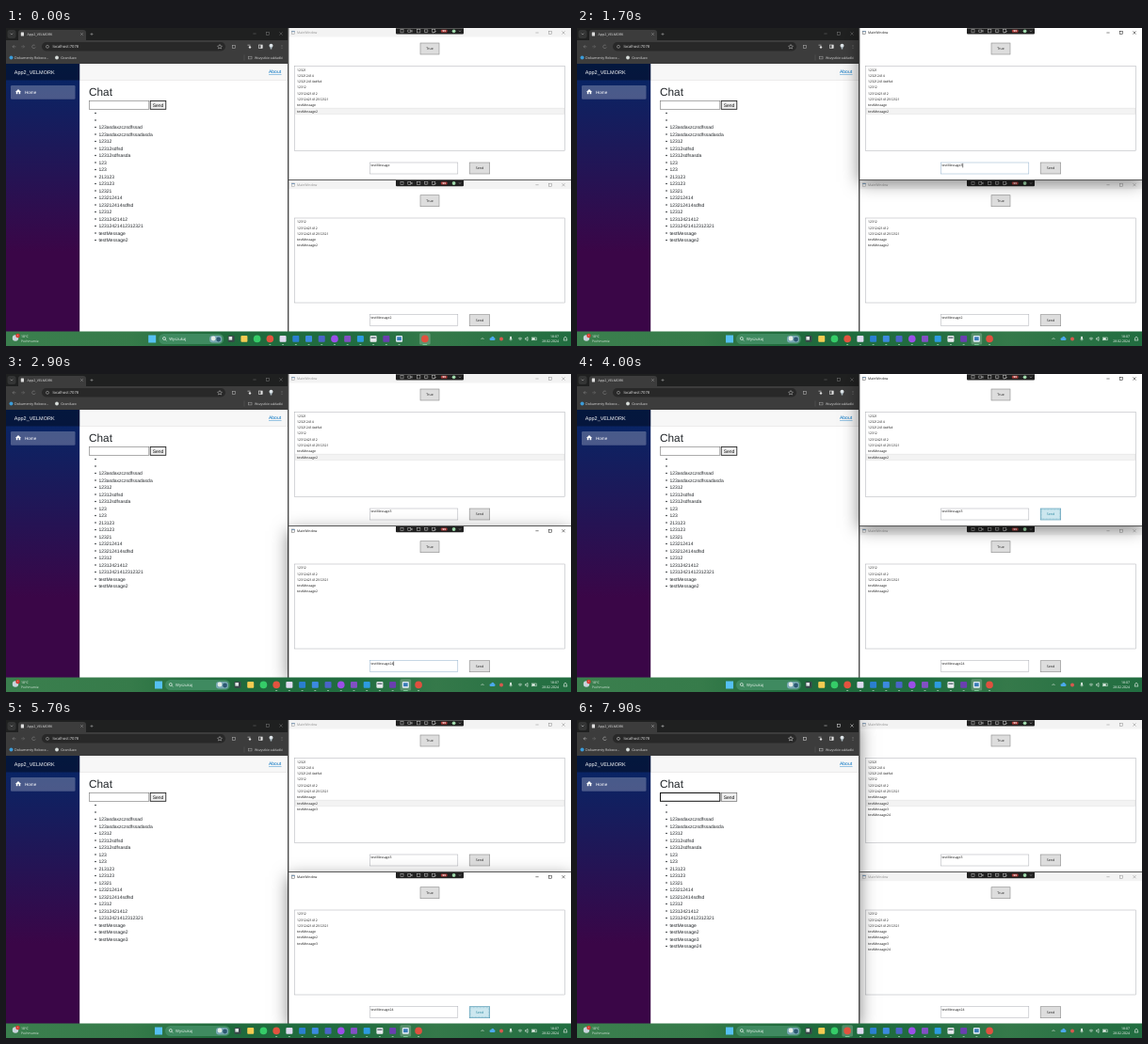
Animation, 600 px wide and 338 px high, one loop 8000 ms. Source, as an HTML page with a canvas:

```html
<!DOCTYPE html>
<html lang="pl">
<head>
<meta charset="utf-8">
<title>Chat</title>
<style>
html, body { margin: 0; width: 100%; height: 100%; overflow: hidden; background: #fff; }
canvas { display: block; width: 600px; height: 338px; }
</style>
</head>
<body>
<canvas id="stage"></canvas>
<script>
const W = 600, H = 338, LOOP = 8000;
const UI = '"Open Sans", "Noto Sans", sans-serif';
const WEB = '"Liberation Sans", Arial, sans-serif';
const canvas = document.getElementById('stage');
const ctx = canvas.getContext('2d');
const dpr = window.devicePixelRatio || 1;
canvas.width = W * dpr;
canvas.height = H * dpr;

// Moments of the session, in ms
const T = {
  topFocus: 800, topTyped: 1500, bottomFocus: 1900, bottomTyped: 2400,
  topHover: 3600, topSend: 4000, topReceived: 4300, topLeave: 5000,
  bottomHover: 5150, bottomSend: 5700, bottomReceived: 6000,
  browserFocus: 7200, caretOff: 7900
};

const APP = 'App2_VELMORK';
const chatLog = ['', '', '123asdaxzczsdfssad', '123asdaxzczsdfssadasda', '12312',
  '12312sdfsd', '12312sdfsasda', '123', '123', '213123', '123123', '12321',
  '123212414', '123212414sdfsd', '12312', '12312421412', '12312421412312321',
  'testMessage', 'testMessage2'];
const topLog = chatLog.slice(11);
const bottomLog = chatLog.slice(14);

const clamp = v => Math.max(0, Math.min(1, v));
const easeOut = v => 1 - Math.pow(1 - clamp(v), 3);

function rect(x, y, w, h, fill) {
  ctx.fillStyle = fill;
  ctx.fillRect(x, y, w, h);
}

function frame(x, y, w, h, color, lw = 0.5) {
  ctx.strokeStyle = color;
  ctx.lineWidth = lw;
  ctx.strokeRect(x, y, w, h);
}

function pill(x, y, w, h, r, fill) {
  ctx.fillStyle = fill;
  ctx.beginPath();
  ctx.roundRect(x, y, w, h, r);
  ctx.fill();
}

function dot(x, y, r, fill) {
  ctx.fillStyle = fill;
  ctx.beginPath();
  ctx.arc(x, y, r, 0, Math.PI * 2);
  ctx.fill();
}

function ring(x, y, r, color, lw = 0.6, from = 0, to = Math.PI * 2) {
  ctx.strokeStyle = color;
  ctx.lineWidth = lw;
  ctx.beginPath();
  ctx.arc(x, y, r, from, to);
  ctx.stroke();
}

// Polyline through x, y pairs
function line(color, lw, ...p) {
  ctx.strokeStyle = color;
  ctx.lineWidth = lw;
  ctx.beginPath();
  for (let i = 0; i < p.length; i += 2) ctx.lineTo(p[i], p[i + 1]);
  ctx.stroke();
}

function cross(x, y, r, color, lw = 0.5) {
  line(color, lw, x - r, y - r, x + r, y + r);
  line(color, lw, x + r, y - r, x - r, y + r);
}

// Text centred vertically on y; returns its width
function text(s, x, y, size, color, font = UI, align = 'left', weight = 400) {
  ctx.font = `${weight} ${size}px ${font}`;
  ctx.fillStyle = color;
  ctx.textAlign = align;
  ctx.fillText(s, x, y + size * 0.36);
  return ctx.measureText(s).width;
}

// Window background; the active window casts a soft shadow
function windowBase(x, y, w, h, active) {
  ctx.save();
  if (active) {
    ctx.shadowColor = 'rgba(0,0,0,0.5)';
    ctx.shadowBlur = 17 * dpr;
    ctx.shadowOffsetY = 4 * dpr;
  }
  rect(x, y, w, h, '#fff');
  ctx.restore();
}

function windowControls(xs, y, color) {
  line(color, 0.5, xs[0] - 1.6, y, xs[0] + 1.6, y);
  frame(xs[1] - 1.5, y - 1.5, 3, 3, color);
  cross(xs[2], y, 1.6, color);
}

function browserChrome(active) {
  const ink = active ? '#c7c7c7' : '#a6a6a6';
  const dim = '#777';
  rect(0, 0, 300, 13, '#1f2020');
  pill(1.5, 2, 9, 9, 2.5, '#343535');
  line(ink, 0.6, 4.7, 5.7, 6, 7, 7.3, 5.7);
  pill(13, 2, 72, 12, [3, 3, 0, 0], '#3c3c3c');
  pill(15.8, 4.4, 3.2, 4.2, 0.5, '#dcdcdc');
  text(APP, 22.5, 6.5, 3.6, '#e3e3e3');
  cross(80.5, 6.5, 1.2, ink);
  line(ink, 0.5, 89.5, 6.5, 92.5, 6.5);
  line(ink, 0.5, 91, 5, 91, 8);
  windowControls([264, 278, 292], 6, active ? '#e8e8e8' : '#777');

  rect(0, 13, 300, 25, '#3c3c3c');
  const nav = active ? ink : '#8a8a8a';
  line(nav, 0.5, 8.6, 18.2, 7, 19.8, 8.6, 21.4);
  line(nav, 0.5, 7, 19.8, 10.4, 19.8);
  line(dim, 0.5, 18, 18.2, 19.6, 19.8, 18, 21.4);
  line(dim, 0.5, 16.2, 19.8, 19.6, 19.8);
  ring(29.5, 19.8, 1.8, nav, 0.5, 0.3, 5.6);
  pill(38, 15, 195, 9.5, 4.7, '#282828');
  ring(44, 19.8, 1.5, ink, 0.6);
  text('localhost:7078', 49.5, 19.8, 4.1, '#e3e3e3');
  line(ink, 0.6, 227, 17.5, 227.8, 19, 229.4, 19.2, 228.2, 20.4, 228.5, 22,
    227, 21.2, 225.5, 22, 225.8, 20.4, 224.6, 19.2, 226.2, 19, 227, 17.5);
  frame(240.6, 18.4, 3, 3, ink, 0.6);
  line('#e0e0e0', 0.6, 256.5, 18.2, 259.5, 18.2);
  dot(259, 20.4, 1.2, '#e0e0e0');
  frame(268.6, 18, 3.6, 3.6, '#e0e0e0', 0.6);
  rect(270.4, 18, 1.8, 3.6, '#e0e0e0');
  dot(281.5, 18.8, 2, '#dfe6ea');
  pill(280.7, 19.8, 1.6, 2.6, 0.5, '#aebcc4');
  for (let i = -1; i < 2; i++) dot(293, 19.8 + i * 1.5, 0.4, ink);

  dot(5.5, 31.5, 2, '#3b9bd8');
  text('Dokumenty Robocz…', 9, 31.5, 3.7, '#dcdcdc');
  dot(54, 31.5, 1.9, '#d8dedb');
  text('Graniluzo', 58.3, 31.5, 3.7, '#dcdcdc');
  line('#666', 0.4, 253, 28.5, 253, 34.5);
  frame(257.4, 30.2, 3.6, 2.7, ink);
  text('Wszystkie zakładki', 264, 31.5, 3.5, '#dcdcdc');
}

function page(t) {
  const side = 78.2;
  rect(side, 38, 300 - side, 17.5, '#f7f7f7');
  rect(side, 55.3, 300 - side, 0.4, '#d6d5d5');
  text('About', 279, 46.6, 5, '#0071c1', WEB);
  rect(279, 49.1, 13.5, 0.4, '#0071c1');

  const g = ctx.createLinearGradient(0, 38, 0, 323);
  g.addColorStop(0, '#052767');
  g.addColorStop(0.7, '#3a0647');
  rect(0, 38, side, 285, g);
  rect(0, 38, side, 17.5, 'rgba(0,0,0,0.4)');
  text(APP, 8.8, 46.8, 5.5, '#fff', WEB);
  pill(5, 61, 68.5, 14.8, 1.2, 'rgba(255,255,255,0.25)');
  ctx.fillStyle = '#fff';
  ctx.beginPath();
  ctx.moveTo(10, 68);
  ctx.lineTo(13, 65);
  ctx.lineTo(16, 68);
  ctx.fill();
  rect(10.8, 67.6, 1.6, 2.6, '#fff');
  rect(13.6, 67.6, 1.6, 2.6, '#fff');
  text('Home', 20, 68.3, 4.6, '#fff', WEB);

  text('Chat', 88, 68, 11.8, '#212529', WEB);
  const focused = t >= T.browserFocus;
  frame(88.5, 77.5, 63.3, 8.8, focused ? '#111' : '#767676', focused ? 1 : 0.6);
  if (focused && t < T.caretOff) rect(90, 79.3, 0.4, 5.2, '#000');
  rect(153.2, 77.5, 16.6, 8.8, '#efefef');
  frame(153.2, 77.5, 16.6, 8.8, focused ? '#555' : '#111', focused ? 0.6 : 0.8);
  text('Send', 161.5, 81.9, 5, '#111', WEB, 'center');

  received(chatLog, t).forEach((s, i) => {
    const y = 90.5 + i * 7.5;
    dot(95, y, 0.8, '#212529');
    text(s, 98.4, y, 5, '#212529', WEB);
  });
}

function browser(t, active) {
  windowBase(0, 0, 300, 323, active);
  browserChrome(active);
  page(t);
  rect(299, 0, 1, 323, '#4a4a4a');
}

function received(log, t) {
  const out = log.slice();
  if (t >= T.topReceived) out.push('testMessage3');
  if (t >= T.bottomReceived) out.push('testMessage24');
  return out;
}

function recorderBar(y) {
  pill(414, y, 72, 6.3, [0, 0, 1, 1], '#202020');
  const ink = '#c4c4c4', c = y + 3.1;
  frame(419, c - 1.6, 3, 3.2, ink);
  frame(426.8, c - 1.3, 3, 2.6, ink);
  line(ink, 0.5, 429.8, c, 431.2, c - 1, 431.2, c + 1, 429.8, c);
  frame(436.3, c - 1.6, 3.6, 3.2, ink);
  frame(444.3, c - 1.4, 3.6, 2.4, ink);
  line(ink, 0.5, 446, c + 1, 446, c + 2);
  frame(452.4, c - 1.6, 3.4, 2.8, ink);
  line(ink, 0.5, 453, c + 2, 457, c);
  pill(461.9, c - 1.5, 6.6, 3, 0.8, '#a83a38');
  text('99', 465.2, c, 2.8, '#fff', UI, 'center', 700);
  dot(475.6, c, 1.9, '#8fcf9c');
  line('#fff', 0.5, 474.7, c, 475.4, c + 0.7, 476.6, c - 0.7);
  line(ink, 0.5, 481, c - 0.6, 482, c + 0.5, 483, c - 0.6);
}

function button(label, x, y, w, hover) {
  rect(x, y, w, 12, '#ddd');
  ctx.globalAlpha = hover;
  rect(x, y, w, 12, '#cce7ef');
  ctx.globalAlpha = 1;
  frame(x, y, w, 12, hover > 0.5 ? '#4a93b0' : '#8a8a8a', 0.6);
  text(label, x + w / 2, y + 6, 3.5, hover > 0.5 ? '#1c7f98' : '#111', UI, 'center');
}

function appWindow(oy, w) {
  ctx.save();
  ctx.translate(0, oy);
  windowBase(300, 0, 300, 161.3, w.active);
  if (!w.active) rect(300, 0, 300, 9.5, '#f3f3f3');
  const ink = w.active ? '#111' : '#8d8d8d';
  frame(303.3, 3.3, 3.4, 3.2, w.active ? '#555' : '#999');
  rect(303.3, 3.3, 3.4, 0.9, '#6f94b8');
  text('MainWindow', 309, 5, 3.5, ink);
  windowControls([564, 578, 592], 5, ink);
  recorderBar(0.2);
  button('True', 440, 16, 20, 0);

  frame(306.7, 40.3, 286.6, 90, '#abadb3');
  w.log.forEach((s, i) => {
    const y = 44.4 + i * 6.27;
    if (i === w.selected) {
      rect(307.2, y - 3.2, 285.6, 6.3, '#f3f3f3');
      frame(307.2, y - 3.2, 285.6, 6.3, '#dadada', 0.4);
    }
    text(s, 309, y, 3.45, '#111');
  });

  frame(386.5, 143, 93.3, 12, w.typing ? '#8fb0cc' : '#abadb3');
  const width = text(w.input, 387.4, 146, 3.45, '#111');
  if (w.caret) rect(387.6 + width, 143.8, 0.5, 4.6, '#000');
  button('Send', 492.2, 143, 21.5, w.hover);
  if (w.sendFocus) {
    ctx.setLineDash([0.8, 0.6]);
    frame(493.2, 144, 19.5, 10, '#4f9fb8', 0.4);
    ctx.setLineDash([]);
  }
  rect(300, 0, 0.5, 161.3, '#777');
  ctx.restore();
}

function fade(t, from, to) {
  return clamp((t - from) / 200) * (1 - clamp((t - to) / 200));
}

// Paints the three windows, the active one last
function windows(t) {
  const between = (a, b) => t >= a && t < b;
  const topTyping = between(T.topFocus, T.bottomFocus);
  const topClicked = between(T.topSend, T.bottomSend);
  const bottomTyping = between(T.bottomFocus, T.topSend);
  const bottomClicked = between(T.bottomSend, T.browserFocus);

  const top = {
    active: topTyping || topClicked, log: received(topLog, t), selected: 7,
    input: t < T.topTyped ? 'testMessage' : 'testMessage3',
    typing: topTyping, caret: topTyping,
    hover: fade(t, T.topHover, T.topLeave),
    sendFocus: between(T.topSend, T.topLeave)
  };
  const bottom = {
    active: bottomTyping || bottomClicked, log: received(bottomLog, t), selected: -1,
    input: t < T.bottomTyped ? 'testMessage2' : 'testMessage24',
    typing: bottomTyping, caret: between(T.bottomFocus, T.topHover),
    hover: fade(t, T.bottomHover, T.browserFocus),
    sendFocus: bottomClicked
  };
  const browsing = t >= T.browserFocus;
  [
    { active: browsing, paint: () => browser(t, browsing) },
    { active: top.active, paint: () => appWindow(0, top) },
    { active: bottom.active, paint: () => appWindow(161.7, bottom) }
  ].sort((a, b) => a.active - b.active).forEach(w => w.paint());
  rect(300, 161, 300, 0.9, '#4a4a4a');
}

// Taskbar shortcuts: r = round, s = square
const shortcuts = ['s#39474a', 's#f4cb52', 'r#35cc68', 'r#e2533f', 's#dedaf0',
  's#2a7fd0', 's#3c8ae0', 's#4a64c8', 'r#9a4fe8', 's#8250c4', 's#2d9be0',
  's#e6e9ec', 's#6a3fb0', 's#dfeaf4', 'r#e0503f'];

function taskbar(t) {
  const g = ctx.createLinearGradient(0, 0, W, 0);
  g.addColorStop(0, '#3b7f4e');
  g.addColorStop(0.22, '#367b4a');
  g.addColorStop(0.37, '#1f6a3c');
  g.addColorStop(0.62, '#216d40');
  g.addColorStop(0.76, '#35794a');
  g.addColorStop(1, '#216d40');
  rect(0, 322.5, W, 15.5, g);
  dot(10, 329.5, 3.2, '#c9d4dc');
  dot(12.5, 327, 2.2, '#d8382e');
  text('1', 12.5, 327, 3, '#fff', UI, 'center');
  text('10°C', 16, 328, 3.5, '#fff');
  text('Pochmurnie', 16, 333, 3.3, '#e4efe8');

  const settle = easeOut((t - 50) / 500);
  const dx = -6.8 * (1 - settle);
  rect(158 + dx, 326.5, 8, 8, '#55c0f2');

  pill(169 + dx, 325, 69, 11, 5.5, '#3f8a60');
  ring(174.8 + dx, 330, 1.5, '#fff', 0.6);
  line('#fff', 0.6, 175.9 + dx, 331.1, 177.2 + dx, 332.5);
  text('Wyszukaj', 180 + dx, 330.5, 4.2, '#f4faf6');
  pill(223 + dx, 327, 13, 7.5, 3, '#7aa9b4');
  dot(227 + dx, 330, 2.4, '#e4ece6');
  dot(232.5 + dx, 331, 2.4, '#2c5873');

  const current = t < T.topFocus ? 14 : t < T.browserFocus ? 13 : 3;
  shortcuts.forEach((spec, i) => {
    const last = i === shortcuts.length - 1;
    const x = 246 + i * 13.72 + (last ? -dx : dx);
    const color = spec.slice(1);
    if (i === current) pill(x - 5.8, 324.2, 11.6, 12.4, 1.5, 'rgba(255,255,255,0.22)');
    if (spec[0] === 'r') dot(x, 330.4, 3.8, color);
    else pill(x - 3.5, 327, 7, 6.8, 1, color);
    if (i === 0) rect(x - 2.6, 328, 3.6, 3.6, '#e2e8e6');
    if (i === 13) rect(x - 2.3, 328.3, 4.6, 3.8, '#397bb8');
    if (i === 11) rect(x - 2.5, 328.5, 5, 1.3, '#53636e');
    if (i === current) pill(x - 2.5, 336, 5, 0.8, 0.4, '#8ee0ae');
    else if (i > 2) pill(x - 1, 336, 2, 0.7, 0.3, '#b1cfbd');
  });
  tray();
}

function tray() {
  const ink = '#eef5f0';
  line(ink, 0.6, 504.5, 331, 506, 329.5, 507.5, 331);
  pill(513.5, 329.3, 6, 2.8, 1.4, '#4ba9ec');
  dot(516.8, 329.4, 1.6, '#4ba9ec');
  dot(526, 330.4, 2, '#d8584e');
  pill(535.2, 327.8, 1.7, 3.4, 0.8, ink);
  line(ink, 0.5, 534.3, 330.7, 536, 332.2, 537.8, 330.7);
  for (let r = 1; r < 4; r++) ring(546, 332.2, r, ink, 0.5, Math.PI * 1.25, Math.PI * 1.75);
  line(ink, 0.6, 551.5, 329.7, 552.5, 329.7, 554, 328.4, 554, 332.4, 552.5, 331.1, 551.5, 331.1, 551.5, 329.7);
  frame(558.6, 329, 4.6, 2.8, ink);
  rect(559, 329.4, 2.7, 2, ink);
  text('18:07', 587, 328, 3.5, '#fff', UI, 'right');
  text('28.02.2024', 587, 333, 3.5, '#fff', UI, 'right');
  line(ink, 0.6, 592, 332, 592.6, 331, 592.8, 329, 594, 328, 595.2, 329, 595.4, 331, 596, 332, 592, 332);
}

function draw(t) {
  ctx.setTransform(dpr, 0, 0, dpr, 0, 0);
  ctx.textRendering = 'geometricPrecision';
  rect(0, 0, W, H, '#fff');
  windows(t);
  taskbar(t);
}

const begin = performance.now();
function tick() {
  draw((performance.now() - begin) % LOOP);
  requestAnimationFrame(tick);
}
tick();
</script>
</body>
</html>
```
